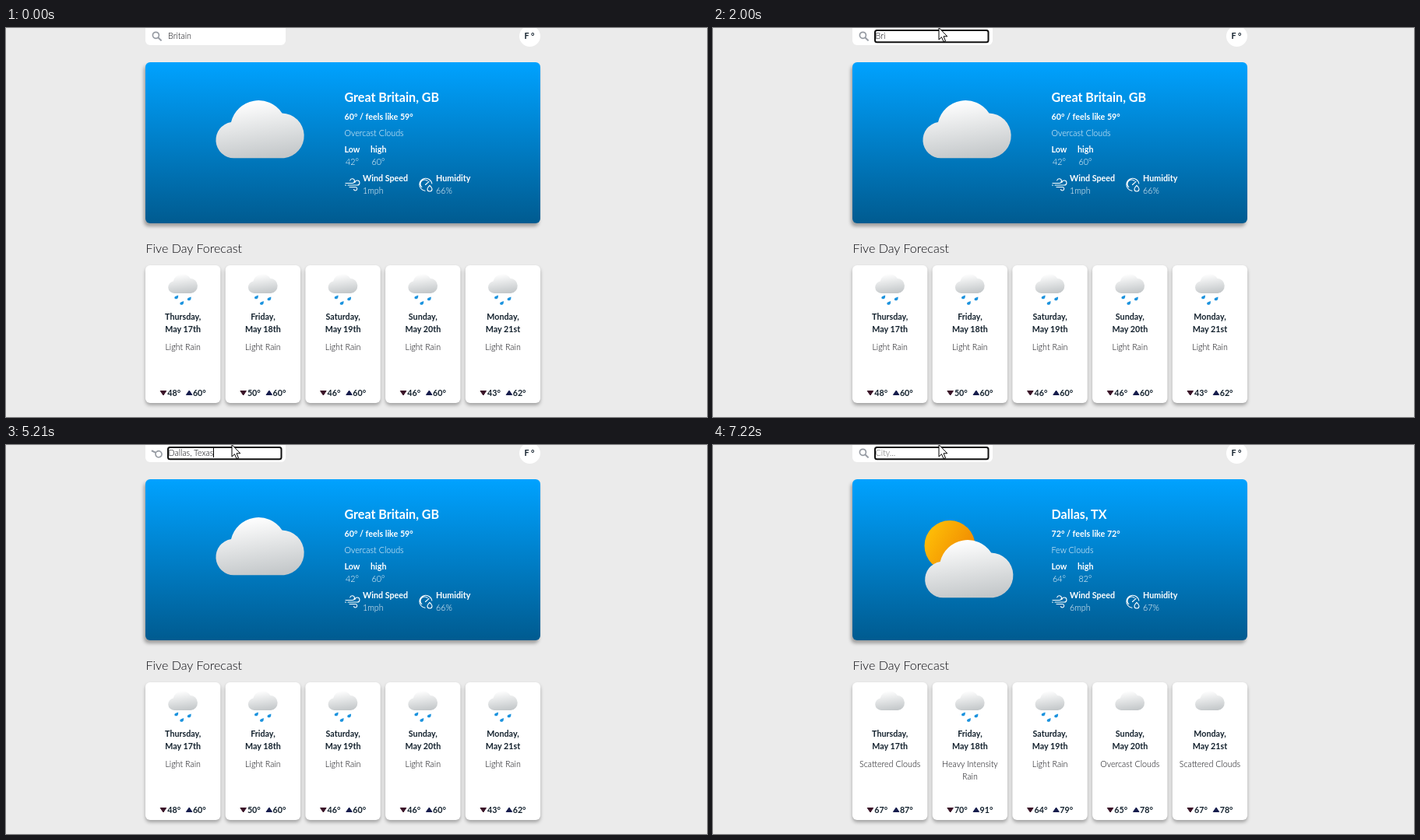
These frames come from a looping animation (900 by 500 pixels, 8 s). An HTML page:

```html
<!DOCTYPE html>
<html lang="en">
<head>
<meta charset="utf-8">
<title>Weather</title>
<style>
html, body { margin: 0; width: 100%; height: 100%; overflow: hidden; background: #ebebeb; }
svg { display: block; }
text { font: 300 10.72px Lato, sans-serif; fill: #0a0a0f; white-space: pre; }
.bold { font-weight: 700; fill: #14222e; }
.big { font-size: 16.08px; }
.mid { text-anchor: middle; }
.hero text { fill: #fff; }
.panel { filter: drop-shadow(-2px 4px 2px rgba(0, 0, 0, .32)); }
.card { fill: #fff; filter: drop-shadow(0 3px 2px rgba(0, 0, 0, .3)); }
.line { fill: none; stroke: #fff; stroke-width: 1.1; stroke-linecap: round; }
</style>
</head>
<body>
<svg width="900" height="500" viewBox="0 0 900 500">
  <defs>
    <linearGradient id="sky" x2="0" y2="1">
      <stop stop-color="#00a2ff"/><stop offset="1" stop-color="#005b90"/>
    </linearGradient>
    <linearGradient id="grey" x1=".4" x2=".6" y2="1">
      <stop stop-color="#fff"/><stop offset="1" stop-color="#c3c7c9"/>
    </linearGradient>
    <linearGradient id="gold" y1=".2" x2="1" y2=".8">
      <stop stop-color="#ffc107"/><stop offset="1" stop-color="#ee8100"/>
    </linearGradient>
    <path id="cloud" fill="url(#grey)" d="M292.5 167.3A23.3 23.3 0 0 1 289 121A36.2 36.2 0 0 1 354.5 109.5A29 29 0 0 1 357 167.3Z"/>
    <path id="drop" fill="#1c93de" d="M2.4-2.6C2.6 0 2 2.3-.4 2.3C-2.6 2.3-3-.2-1.4-1.1Z"/>
    <g id="rain">
      <use href="#drop" x="-8.5" y="346"/><use href="#drop" x="8" y="348"/><use href="#drop" x="-1.5" y="353.5"/>
    </g>
  </defs>

  <rect x="179" y="-12" width="180" height="34" rx="6" fill="#fff"/>
  <g id="lens" fill="none" stroke="#969ba3" stroke-width="1.7">
    <circle cx="192.4" cy="9.3" r="4"/><path d="M195.3 12.2L199.6 16.4" stroke-width="2"/>
  </g>
  <text id="field" y="14"></text>
  <rect id="caret" y="4" width="1" height="12"/>
  <rect id="focus" x="208" y="3" width="145.5" height="15.2" rx="2.5" fill="none" stroke="#101010" stroke-width="2"/>
  <circle cx="672.5" cy="10.5" r="13.5" fill="#fff"/>
  <text class="bold mid" x="672" y="14">F °</text>

  <rect class="panel" x="179" y="44" width="507" height="207" rx="6" fill="url(#sky)"/>
  <circle id="sun" cx="304" cy="129.5" r="32.5" fill="url(#gold)"/>
  <use id="main" href="#cloud"/>
  <g class="hero">
    <text id="place" class="bold big" x="434.5" y="95"></text>
    <text id="feels" class="bold" x="434.5" y="118"></text>
    <text id="sum" x="434.5" y="139"></text>
    <text class="bold" x="434.5" y="160">Low</text>
    <text class="bold" x="468" y="160">high</text>
    <text id="low" class="mid" x="444.5" y="176"></text>
    <text id="high" class="mid" x="478" y="176"></text>
    <text class="bold" x="458" y="197">Wind Speed</text>
    <text id="wind" x="458" y="213"></text>
    <text class="bold" x="552" y="197">Humidity</text>
    <text id="damp" x="552" y="213"></text>
  </g>
  <path class="line" d="M436 199.5H444.5A2.9 2.9 0 1 0 441.7 196M439 202H451A3 3 0 1 0 448 198.5M435.5 202H436.5M441 204.5H448.5A2.2 2.2 0 1 1 446.5 207.5"/>
  <path class="line" stroke-width="1.3" d="M538 209.2A8 8 0 1 1 546.8 200M533.8 204.5A5.3 5.3 0 0 1 541 196.4M538.5 201.5L543 197.3M544 202.3C541.5 205 541 206 541 207A3 3 0 0 0 547 207C547 206 546.5 205 544 202.3Z"/>

  <text class="big" x="179.5" y="289">Five Day Forecast</text>
  <g id="cards"></g>
  <g id="arrow"><path fill="#fff" stroke="#000" stroke-width="1" d="M.5.5V16L4 12.7L6.6 18.6L9 17.6L6.5 11.8H11.3Z"/></g>
  <path id="beam" fill="none" stroke="#000" stroke-width="1.5" d="M-3-7.3H-1L0-6.5L1-7.3H3M0-6.5V6.5M-3 7.3H-1L0 6.5L1 7.3H3"/>
</svg>
<script>
const $ = id => document.getElementById(id);
const LOOP = 8000, SPIN = 5000, LOADED = 5470, SUNNY = 6080, FOCUS = 950;
const days = ['Thursday', 'Friday', 'Saturday', 'Sunday', 'Monday'];
const dates = ['17th', '18th', '19th', '20th', '21st'];

const reports = [
  { place: 'Great Britain, GB', feels: '60° / feels like 59°', sum: 'Overcast Clouds',
    low: '42°', high: '60°', wind: '1mph', damp: '66%',
    week: [[48, 60], [50, 60], [46, 60], [46, 60], [43, 62]].map(t => ['Light Rain', ...t]) },
  { place: 'Dallas, TX', feels: '72° / feels like 72°', sum: 'Few Clouds',
    low: '64°', high: '82°', wind: '6mph', damp: '67%',
    week: [['Scattered Clouds', 67, 87], ['Heavy Intensity|Rain', 70, 91], ['Light Rain', 64, 79],
      ['Overcast Clouds', 65, 78], ['Scattered Clouds', 67, 78]] }
];

// [time, text, caret visible]
const typing = [[0, 'Britain', 0], [FOCUS, 'Britain', 1], [1560, 'Britain', 0]];
[1670, 1770, 1870, 2000, 2070, 2200].forEach((t, i) => typing.push([t, 'Britain'.slice(0, 6 - i), t != 2000]));
typing.push([2270, 'B', 0], [2400, '', 0]);
const city = 'Dallas, Texas';
const type = (t, n, caret = 1) => typing.push([t, city.slice(0, n), caret]);
[2610, 2810, 2940, 3070, 3140, 3270, 3340].forEach((t, i) => type(t, i + 1));
[3610, 3740, 3870, 3940, 4070].forEach((t, i) => type(t, i + 9));
type(4540, 13, 0);
type(SPIN, 13);
type(5620, 13, 0);
type(6200, 13);
type(6330, 12);
type(6660, 12, 0);
[6810, 6880, 6950, 7020, 7080, 7150].forEach((t, i) => type(t, 11 - 2 * i));
type(7220, 0, 0);

// [time, pointer, x, y]
const moves = [[0], [190, 'arrow', 792, 419], [260, 'arrow', 499, 70], [330],
  [600, 'beam', 246, 8], [670, 'beam', 254, 10], [740, 'beam', 259, 11], [810, 'beam', 261, 11],
  [880, 'beam', 262, 11], [1010, 'beam', 270, 10], [1080, 'beam', 283, 8], [1150, 'arrow', 289.5, -1]];

const at = (list, t) => list.findLast(step => step[0] <= t);
const show = (id, on) => $(id).setAttribute('visibility', on ? 'visible' : 'hidden');

function card([sum, low, high], i) {
  const lines = sum.split('|').map((s, k) => `<text class="mid" y="${414 + 16 * k}">${s}</text>`).join('');
  return `<g transform="translate(${227.2 + 102.7 * i})">
    <rect class="card" x="-48.2" y="305" width="96.3" height="177" rx="6"/>
    <use href="#cloud" transform="translate(-108.8 285.2) scale(.3333)"/>
    ${sum.includes('Rain') ? '<use href="#rain"/>' : ''}
    <text class="bold mid" y="375">${days[i]},</text>
    <text class="bold mid" y="391">May ${dates[i]}</text>${lines}
    <path d="M-29 466.5H-21.5L-25.2 472Z" fill="#3a1428" stroke="#3a1428" stroke-linejoin="round"/>
    <text class="bold" x="-20" y="473">${low}°</text>
    <path d="M4.2 471.5H11.7L8 466Z" fill="#161c4c" stroke="#161c4c" stroke-linejoin="round"/>
    <text class="bold" x="12.7" y="473">${high}°</text></g>`;
}

let shown;
function setReport(report) {
  if (report === shown) return;
  shown = report;
  for (const id of ['place', 'feels', 'sum', 'low', 'high', 'wind', 'damp']) $(id).textContent = report[id];
  $('cards').innerHTML = report.week.map(card).join('');
}

function draw(now) {
  const t = now % LOOP;
  setReport(reports[+(t >= LOADED)]);
  show('sun', t >= SUNNY);
  $('main').setAttribute('transform', t >= SUNNY ? 'translate(2.7 29)' : '');

  const [, text, caret] = at(typing, t);
  const left = t < FOCUS ? 208 : 208.5;
  $('field').textContent = text || 'City...';
  $('field').setAttribute('x', left);
  $('field').style.fill = text ? '' : '#666';
  $('caret').setAttribute('x', Math.floor(left + $('field').getComputedTextLength()));
  show('caret', caret);
  show('focus', t >= FOCUS);

  const turn = t >= SPIN && t < LOADED ? 360 * (t - SPIN) / (LOADED - SPIN) : 0;
  $('lens').setAttribute('transform', `rotate(${turn} 194 10.8)`);

  const [, kind, x, y] = at(moves, t);
  for (const id of ['arrow', 'beam']) {
    show(id, id === kind);
    if (id === kind) $(id).setAttribute('transform', `translate(${x} ${y})`);
  }
  requestAnimationFrame(draw);
}
requestAnimationFrame(draw);
</script>
</body>
</html>
```
